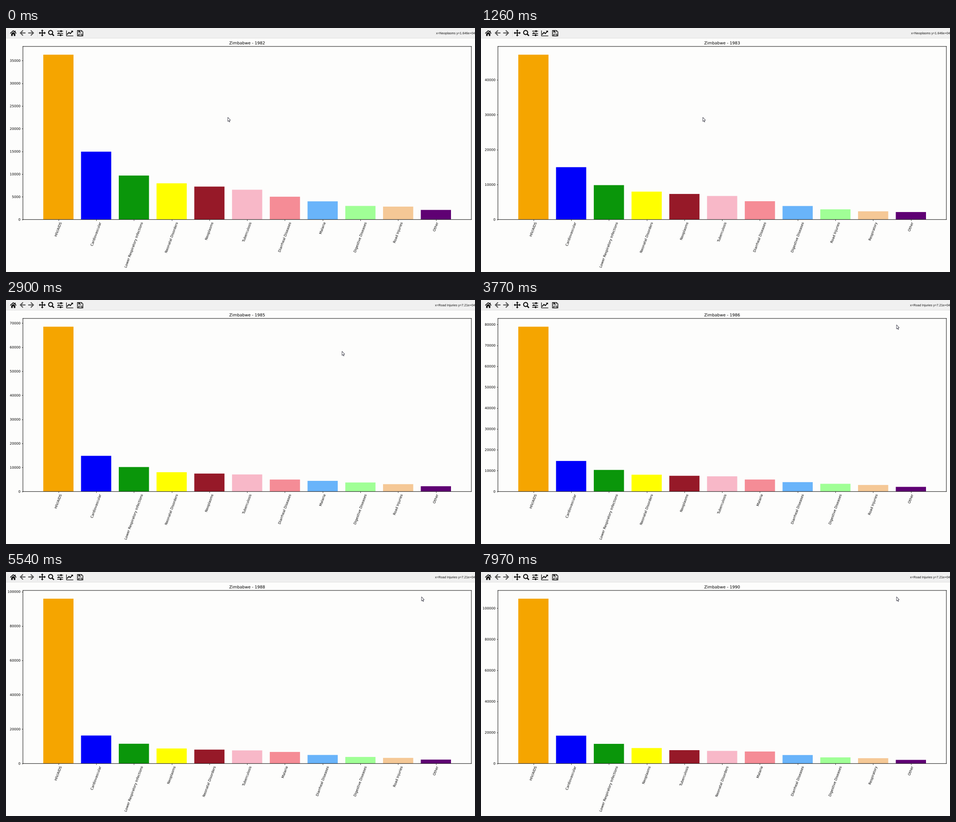
Recreate the animation shown at these times as a matplotlib script. Size 1035 by 541 pixels, loop 8 s.

```python
import matplotlib.pyplot as plt
import numpy as np
from matplotlib.animation import FuncAnimation
from matplotlib.patches import Circle, Polygon, Rectangle
from matplotlib.patheffects import Normal

W, H = 1035, 541
FRAMES, STEP = 250, 32
PX = 0.72            # one pixel in points at 100 dpi
PT = 0.75 * PX       # chart text is drawn at three-quarter scale
FIRST, FIRST_SWITCH, PERIOD = 1982, 280, 1050
LEFT, RIGHT, TOP, BOTTOM = 37.3, 1027, 40.9, 424.7
PAPER, BAR_GREY, INK = "#fdfdfc", "#f0f0f0", "#101010"

# The path effect draws text as outlines, placed at fractions of a pixel
plt.rcParams.update({"font.family": "DejaVu Sans", "text.hinting": "none",
                     "path.effects": [Normal()]})

# Turning points of each curve: years since FIRST -> deaths
TRENDS = {
    "HIV/AIDS": {0: 36310, 2: 58130, 4: 78960, 6: 95900, 8: 106150},
    "Cardiovascular": {0: 14950, 2: 15050, 4: 14650, 8: 17960},
    "Lower Respiratory Infections": {0: 9690, 4: 10360, 8: 12680},
    "Neonatal Disorders": {0: 7980, 8: 8150},
    "Neoplasms": {0: 7260, 4: 7550, 8: 9980},
    "Tuberculosis": {0: 6570, 6: 7650, 8: 8620},
    "Diarrheal Diseases": {0: 5030, 2: 5470, 4: 4510, 8: 5480},
    "Malaria": {0: 4010, 1: 2000, 2: 3130, 4: 5760, 8: 7750},
    "Digestive Diseases": {0: 3000, 1: 3880, 4: 3710, 8: 3970},
    "Road Injuries": {0: 2850, 8: 3440},
    "Respiratory": {0: 2200, 8: 3450},
}
OTHER = {0: 2120, 8: 2360}
COLORS = ["#f5a500", "#0000fa", "#0a960a", "#ffff00", "#961928", "#f8b8c8",
          "#f58c96", "#69b4fa", "#a0ff96", "#f5c896", "#5f0073"]


def follow(trend, year):
    return np.interp(year, list(trend), list(trend.values()))


def ranking(year):
    """Ten largest causes in falling order, then the rest."""
    rows = [(follow(trend, year), name) for name, trend in TRENDS.items()]
    return sorted(rows, reverse=True)[:10] + [(follow(OTHER, year), "Other")]


fig = plt.figure(figsize=(W / 100, H / 100), dpi=100, facecolor=PAPER)

# Bar chart
ax = fig.add_axes([LEFT / W, 1 - BOTTOM / H, (RIGHT - LEFT) / W, (BOTTOM - TOP) / H],
                  facecolor=PAPER)
bars = ax.bar(range(11), 1, color=COLORS, snap=False)
ax.set_xlim(-0.94, 10.94)
ax.set_xticks(range(11))
ax.tick_params(labelsize=10 * PT, length=3.5 * PT, pad=3.5 * PT, width=0.9 * PX)
ax.tick_params(axis="x", labelrotation=70)
for spine in ax.spines.values():
    spine.set(linewidth=0.95 * PX, snap=False)
title = ax.set_title("", fontsize=12 * PT, pad=6 * PT)

# Window layer in pixel coordinates
ui = fig.add_axes([0, 0, 1, 1], zorder=5)
ui.set(xlim=(0, W), ylim=(H, 0))
ui.axis("off")


def poly(points, color=INK, **kw):
    return ui.add_patch(Polygon(points, fc=color, **{"ec": "none", **kw}))


def box(x0, y0, x1, y1, color=INK, **kw):
    ui.add_patch(Rectangle((x0, y0), x1 - x0, y1 - y0, fc=color, **{"ec": "none", **kw}))


def line(points, width, color=INK, **kw):
    ui.plot(*zip(*points), color=color, lw=width * PX, solid_joinstyle="miter",
            solid_capstyle="butt", **kw)


def draw_toolbar():
    box(0, 0, W, 21.5, BAR_GREY)
    line([(0, 21.5), (W, 21.5)], 1, "#dedede")
    line([(4, 5), (4, 18)], 1, "#c8c8c8", ls=(0, (1, 1.5)))
    for x in (68.5, 153.5):
        line([(x, 4), (x, 19)], 1, "#e0e0e0")

    # home
    line([(9.3, 12), (16, 6), (22.7, 12)], 1.7)
    poly([(11.4, 12.7), (16, 8.7), (20.6, 12.7), (20.6, 17.7), (17.2, 17.7),
          (17.2, 14), (14.8, 14), (14.8, 17.7), (11.4, 17.7)])
    box(19, 5.8, 20.8, 10)

    # back and forward
    for x, s in ((36.5, 1), (55.7, -1)):
        line([(x - 5 * s, 11), (x + 6.3 * s, 11)], 2.2, "#555555")
        line([(x + s, 5.3), (x - 4.8 * s, 11), (x + s, 16.7)], 2.2, "#555555")

    # pan
    line([(74, 11), (86, 11)], 2)
    line([(80, 5), (80, 17)], 2)
    for s in (-1, 1):
        poly([(80 + 7.7 * s, 11), (80 + 4.5 * s, 8), (80 + 4.5 * s, 14)])
        poly([(80, 11 + 7.7 * s), (77, 11 + 4.5 * s), (83, 11 + 4.5 * s)])

    # zoom
    ui.add_patch(Circle((98.5, 10), 4.5, fc="none", ec=INK, lw=2.1 * PX))
    line([(101.6, 13.1), (105.8, 17.3)], 2.7)

    # sliders
    for y, x in ((6.7, 121.5), (11.5, 116.5), (16.3, 120.5)):
        line([(113, y), (126.3, y)], 1.5)
        box(x - 1.4, y - 1.9, x + 1.4, y + 1.9)

    # line chart
    line([(133, 5), (133, 17.2), (148, 17.2)], 1.3)
    line([(134.8, 14.4), (139, 9.8), (141.8, 12.4), (146.3, 7.4)], 2)
    poly([(143.2, 5.6), (147.8, 5.6), (147.8, 10.2)])

    # save
    poly([(157.7, 5.6), (166.6, 5.6), (169.6, 8.6), (169.6, 17.5), (157.7, 17.5)],
         "none", ec=INK, lw=1.5 * PX)
    box(160, 5.6, 165.8, 9.6)
    box(163, 6.3, 164.5, 8.6, BAR_GREY)
    box(160.2, 12.8, 167.2, 17.5, "none", ec=INK, lw=1.3 * PX)


draw_toolbar()
status = ui.text(1034.5, 11.3, "", fontsize=7.05 * PX, family="Liberation Sans",
                 ha="right", va="center_baseline", color=INK)

ARROW = [(0, 0), (0, 9.2), (2, 7.4), (3.4, 10.4), (4.6, 9.8), (3.3, 6.9), (6, 6.6)]
pointer = poly(ARROW, "white", ec="#40404c", lw=0.9 * PX)
START, END = np.array([489.5, 198]), np.array([917, 55])
MOVE_FROM, MOVE_TIME = 2600, 500


def update(i):
    t = i * STEP
    year = 0 if t < FIRST_SWITCH else 1 + (t - FIRST_SWITCH) // PERIOD
    values, names = zip(*ranking(year))
    for bar, value in zip(bars, values):
        bar.set_height(value)
    ax.set_ylim(0, 1.05 * values[0])
    ax.set_xticklabels(names)
    title.set_text(f"Zimbabwe - {FIRST + year}")

    u = np.clip((t - MOVE_FROM) / MOVE_TIME, 0, 1)
    u = u * u * (3 - 2 * u)
    pointer.set_xy(START + (END - START) * u + ARROW)
    status.set_text("x=Neoplasms y=1.646e+04" if u < 0.5 else
                    "x=Road Injuries y=7.21e+04")
    return []


anim = FuncAnimation(fig, update, frames=FRAMES, interval=STEP,
                     init_func=lambda: update(0), repeat=True, repeat_delay=0)
plt.show()
```
